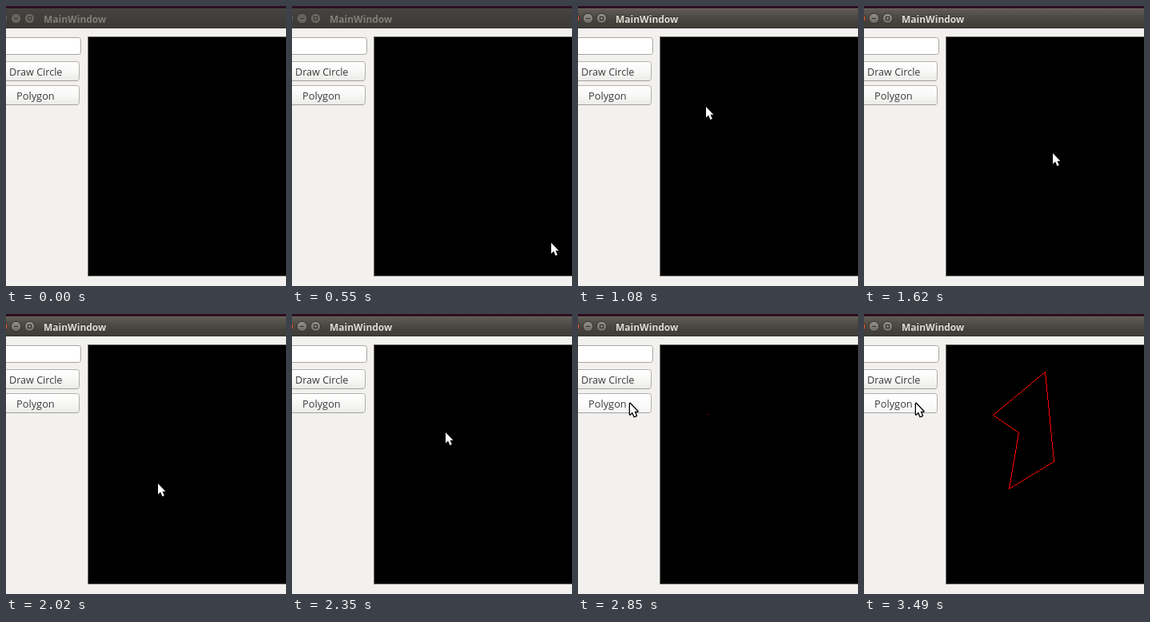
An HTML page with a canvas for the animation above (3.79 s loop, 350x350 px).

```html
<!DOCTYPE html>
<html lang="en">
<head>
<meta charset="utf-8">
<title>Polygon drawing</title>
<style>
html, body { margin: 0; width: 100%; height: 100%; overflow: hidden; background: #f2f1f0; }
canvas { display: block; width: 350px; height: 350px; }
</style>
</head>
<body>
<canvas id="stage" width="350" height="350"></canvas>
<script>
const ctx = document.getElementById('stage').getContext('2d');
const LOOP = 3790;
const ACTIVATE = 1080;
const HOVER = 2600;
const DRAW_START = 2850;

// Pointer moves: start, end, number of visible steps, way points.
const moves = [
  { from: 450, to: 940, steps: 10, path: [[341, 315], [225, 181, 7 / 9], [181, 141]] },
  { from: 990, to: 1030, steps: 2, path: [[168, 131], [160, 126]] },
  { from: 1170, to: 1320, steps: 4, path: [[174, 114], [212, 83, 0.67], [225, 73]] },
  { from: 1520, to: 1620, steps: 3, path: [[222, 95], [231, 150, 0.5], [236, 184]] },
  { from: 1770, to: 2290, steps: 11, path: [[229, 189], [180, 218, 0.5], [192, 150]] },
  { from: 2350, to: 2800, steps: 10, path: [[192, 148], [130, 124, 0.34], [80, 114, 0.67], [65, 112]] }
];

// Polygon growth: time and number of plotted pixels.
const growth = [[2850, 1], [3360, 257], [3450, 303], [3490, 400]];
const corners = [[162, 125], [226, 72], [237, 184], [181, 218], [193, 148], [161, 126]];

const lerp = (a, b, k) => a + (b - a) * k;

function vertical(y0, y1, ...colors) {
  const g = ctx.createLinearGradient(0, y0, 0, y1);
  colors.forEach((c, i) => g.addColorStop(i / (colors.length - 1), c));
  return g;
}

function rect(x, y, w, h, fill) {
  ctx.fillStyle = fill;
  ctx.fillRect(x, y, w, h);
}

function panel(x, y, w, h, fill, stroke) {
  ctx.beginPath();
  ctx.roundRect(x + 0.5, y + 0.5, w - 1, h - 1, 3);
  ctx.fillStyle = fill;
  ctx.fill();
  ctx.strokeStyle = stroke;
  ctx.lineWidth = 1;
  ctx.stroke();
}

function label(text, x, y, font, color) {
  ctx.font = font + ' "Open Sans", "Noto Sans", sans-serif';
  ctx.fillStyle = color;
  ctx.fillText(text, x, y);
}

function disc(x, fill, rim) {
  ctx.beginPath();
  ctx.arc(x, 15.5, 6.3, 0, Math.PI * 2);
  ctx.fillStyle = fill;
  ctx.fill();
  ctx.strokeStyle = rim;
  ctx.lineWidth = 1;
  ctx.stroke();
}

function titleBar(active) {
  rect(0, 0, 350, 3, '#2d0f22');
  rect(0, 3, 350, 25, active
    ? vertical(3, 28, '#625d56', '#514d48', '#45423d', '#3e3c37')
    : vertical(3, 28, '#454440', '#3f3e3a', '#3c3b37'));
  rect(0, 3, 350, 1, active ? '#6f6961' : '#4b4a45');
  rect(0, 27, 350, 1, '#353430');

  const fill = active ? vertical(9, 22, '#96928a', '#6b6862') : '#66645e';
  const rim = active ? '#33312d' : '#393834';
  disc(-4.5, active ? '#ee6034' : '#66645e', rim);
  disc(12.5, fill, rim);
  disc(29.5, fill, rim);
  rect(10, 15, 5, 1, rim);
  ctx.strokeRect(27.5, 13.5, 4, 4);

  if (active) label('MainWindow', 47, 20, 'bold 12px', '#2b2a27');
  label('MainWindow', 47, 21, 'bold 12px', active ? '#e2ded5' : '#817e77');
}

function button(text, x, y, size, hover) {
  const fill = hover
    ? vertical(y, y + 25, '#ffffff', '#fcfcfc', '#f3f3f2')
    : vertical(y, y + 25, '#ffffff', '#f8f8f7', '#eaeae8');
  panel(-30, y, 122, 25, fill, '#b3afaa');
  rect(-5, y + 24, 94, 1, '#a5a19c');
  label(text, x, y + 18, size + 'px', '#3c3c3c');
}

function polygon(count) {
  ctx.fillStyle = '#f00';
  for (let i = 0; i < corners.length - 1 && count > 0; i++) {
    const [x0, y0] = corners[i];
    const [x1, y1] = corners[i + 1];
    const n = Math.max(Math.abs(x1 - x0), Math.abs(y1 - y0));
    for (let k = 0; k <= n && k < count; k++) {
      ctx.fillRect(Math.round(lerp(x0, x1, k / n)), Math.round(lerp(y0, y1, k / n)), 1, 1);
    }
    count -= n;
  }
}

function plotted(t) {
  if (t < DRAW_START) return 0;
  if (t >= 3490) return 400;
  if (t >= 3450) return 303;
  const step = Math.min(11, Math.floor((t - 2890) / 47) + 1);
  return Math.round(lerp(growth[0][1], growth[1][1], Math.max(0, step) / 11));
}

function pointerAt(t) {
  const move = moves.filter(m => t >= m.from).pop();
  if (!move) return null;
  const last = move.steps - 1;
  const gap = (move.to - move.from) / last;
  const k = Math.min(last, Math.floor((t - move.from) / gap + 1e-6)) / last;
  const stops = move.path.map(([x, y, at], i) => ({ x, y, at: at ?? (i ? 1 : 0) }));
  const i = Math.max(1, stops.findIndex(s => s.at >= k - 1e-6));
  const a = stops[i - 1], b = stops[i];
  const f = (k - a.at) / (b.at - a.at);
  return [Math.round(lerp(a.x, b.x, f)), Math.round(lerp(a.y, b.y, f))];
}

const arrow = new Path2D('M0 0V13.5L3.1 10.6L5.4 16L7.8 15L5.5 9.7H9.4Z');

function pointer([x, y]) {
  ctx.save();
  ctx.translate(x, y);
  ctx.lineWidth = 2.6;
  ctx.lineJoin = 'round';
  ctx.strokeStyle = '#000';
  ctx.stroke(arrow);
  ctx.fillStyle = '#fff';
  ctx.fill(arrow);
  ctx.restore();
}

function draw(t) {
  rect(0, 0, 350, 350, '#f2f1f0');
  titleBar(t >= ACTIVATE);
  panel(-30, 39, 124, 22, '#fff', '#aaa69f');
  button('Draw Circle', 4, 69, 12.6, false);
  button('Polygon', 13, 99, 12.8, t >= HOVER);
  rect(102, 38, 248, 300, '#77736e');
  rect(103, 39, 247, 298, '#000');
  polygon(plotted(t));
  const tip = pointerAt(t);
  if (tip) pointer(tip);
}

function frame() {
  draw(performance.now() % LOOP);
  requestAnimationFrame(frame);
}
frame();
</script>
</body>
</html>
```
